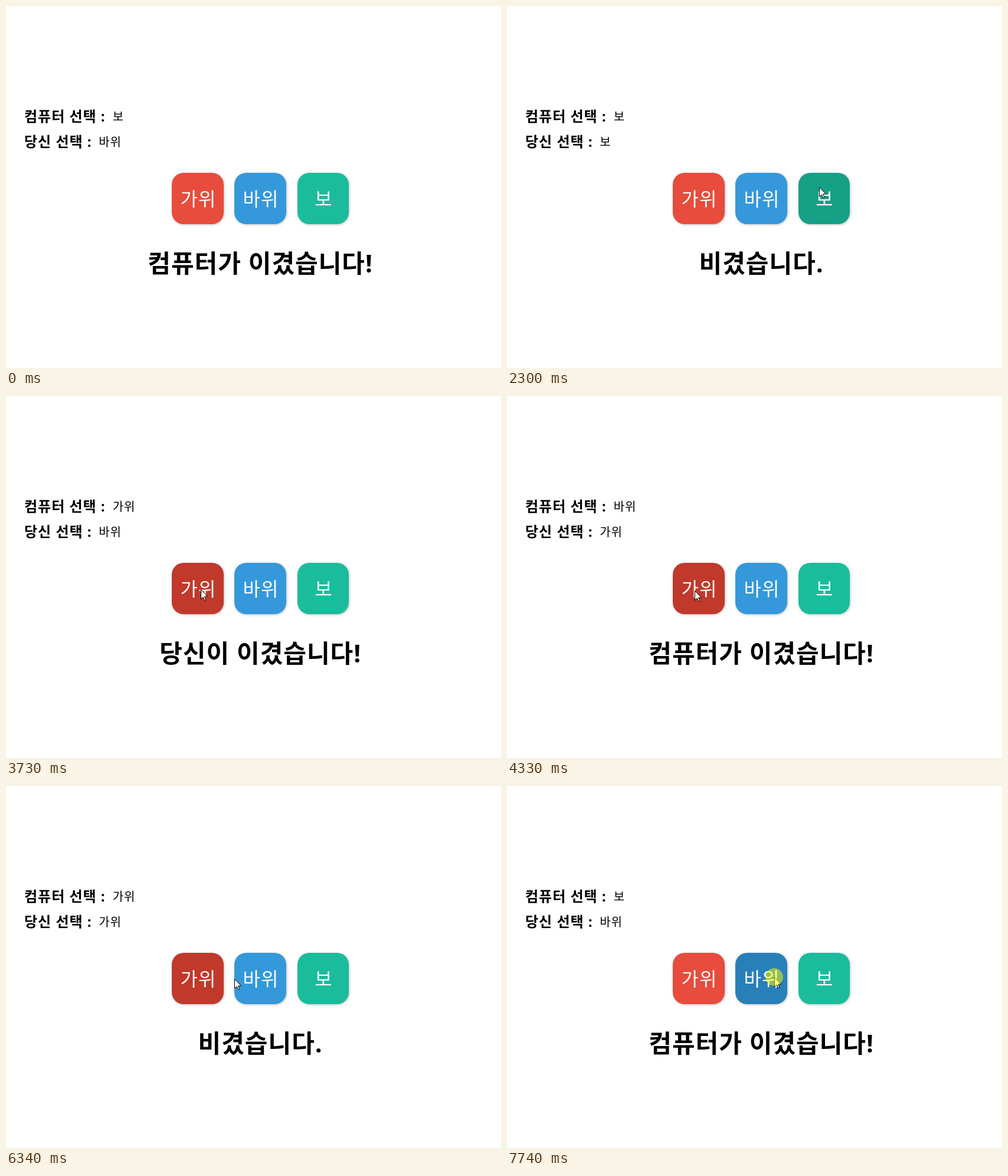
An HTML page that plays this animation: 839 px wide and 614 px high, repeating every 8000 ms.

```html
<!DOCTYPE html>
<html lang="ko">
<head>
<meta charset="utf-8">
<title>가위 바위 보</title>
<style>
  html, body { margin: 0; width: 100%; height: 100%; overflow: hidden; background: #fff; }
  svg { display: block; width: 839px; height: 614px; }
  text { font-family: "Open Sans", "Noto Sans CJK KR", "Noto Sans CJK", sans-serif; letter-spacing: 1px; }
  .label { font-size: 24px; font-weight: 700; }
  .value { font-size: 20px; font-weight: 300; }
  .result { font-size: 42px; font-weight: 700; text-anchor: middle; }
  .button text { font-size: 32px; font-weight: 350; fill: #fff; text-anchor: middle; }
  .button rect { filter: drop-shadow(1px 1px 2px rgba(0, 0, 0, .25)); }
</style>
</head>
<body>
<svg viewBox="0 0 839 614">
  <text class="label" x="31" y="195.5">컴퓨터 선택 :</text>
  <text class="value" id="computer" x="180.7" y="194.5"></text>
  <text class="label" x="31" y="238.5">당신 선택 :</text>
  <text class="value" id="player" x="157.2" y="237.5"></text>
  <g id="buttons"></g>
  <text class="result" id="result" x="431.2" y="452"></text>
  <path id="cursor" d="M.5 .5V16.5L4.2 13L6.8 18.6L9 17.6L6.5 12H11.5Z" fill="#fff" stroke="#000"/>
  <circle id="halo" r="15" fill="#ff0" fill-opacity=".5"/>
</svg>
<script>
const LOOP = 8000;
const STEP = 70;
const HANDS = ['가위', '바위', '보'];
const RESULTS = ['비겼습니다.', '당신이 이겼습니다!', '컴퓨터가 이겼습니다!'];
const [SCISSORS, ROCK, PAPER] = [0, 1, 2];

const TOP = 283, HEIGHT = 87;
const BUTTONS = [
  { x: 281, width: 88, color: '#e74c3c', hover: '#c0392b' },
  { x: 387, width: 88, color: '#3498db', hover: '#2980b9' },
  { x: 494, width: 87, color: '#1abc9c', hover: '#16a085' },
];

// The pointer eases from the end of one move to the end of the next.
const ENTRY = [780, 189];
const MOVES = [
  { start: 1210, steps: 6, to: [478, 308] },
  { start: 1630, steps: 4, to: [529, 307] },
  { start: 2560, steps: 4, to: [433, 311] },
  { start: 3520, steps: 5, to: [318, 330] },
  { start: 6270, steps: 5, to: [453, 324] },
];

// Bursts of clicks; each click ends with a new pick by the computer.
const BURSTS = [
  { down: 2030, up: 2300, picks: [PAPER] },
  { down: 3040, up: 3250, picks: [SCISSORS] },
  { down: 4130, up: 4330, picks: [ROCK] },
  { down: 5060, up: 5260, every: 252, picks: [PAPER, SCISSORS, ROCK, PAPER, SCISSORS] },
  { down: 6810, up: 7010, picks: [ROCK] },
  { down: 7140, up: 7340, every: 200, picks: [PAPER, SCISSORS, PAPER, PAPER, PAPER] },
];
const clickTime = (burst, i) => burst.up + i * (burst.every || 0);

const easeOut = p => 1 - (1 - p) ** 1.4;

function pointerAt(time) {
  const index = MOVES.findLastIndex(move => move.start <= time);
  if (index < 0) return null;
  const { start, steps, to } = MOVES[index];
  const from = index ? MOVES[index - 1].to : ENTRY;
  const step = Math.min(steps, Math.floor((time - start) / STEP) + 1);
  const p = easeOut(step / steps);
  return from.map((value, axis) => Math.round(value + (to[axis] - value) * p));
}

// The hover colour trails the pointer by one step.
function hoveredAt(time) {
  const point = pointerAt(time - STEP);
  if (!point) return -1;
  const [x, y] = point;
  return BUTTONS.findIndex(b => x >= b.x && x < b.x + b.width && y >= TOP && y < TOP + HEIGHT);
}

const rounds = [{ time: 0, theirs: PAPER, yours: ROCK }];
for (const burst of BURSTS) {
  burst.picks.forEach((theirs, i) => {
    const time = clickTime(burst, i);
    rounds.push({ time, theirs, yours: hoveredAt(time) });
  });
}

const [computer, player, result, cursor, halo, buttons] =
  ['computer', 'player', 'result', 'cursor', 'halo', 'buttons'].map(id => document.getElementById(id));

function add(parent, tag, attributes) {
  const node = document.createElementNS('http://www.w3.org/2000/svg', tag);
  for (const name in attributes) node.setAttribute(name, attributes[name]);
  return parent.appendChild(node);
}

BUTTONS.forEach((button, i) => {
  const { x, width } = button;
  const group = add(buttons, 'g', { class: 'button' });
  button.rect = add(group, 'rect', { x, y: TOP, width, height: HEIGHT, rx: 20 });
  add(group, 'text', { x: x + width / 2 + 1, y: 339 }).textContent = HANDS[i];
});

function show(node, point) {
  node.style.display = point ? '' : 'none';
  if (point) node.setAttribute('transform', `translate(${point})`);
}

function draw(time) {
  const { theirs, yours } = rounds.findLast(round => round.time <= time);
  computer.textContent = HANDS[theirs];
  player.textContent = HANDS[yours];
  result.textContent = RESULTS[(yours - theirs + 3) % 3];

  const hovered = hoveredAt(time);
  BUTTONS.forEach(({ rect, color, hover }, i) => rect.setAttribute('fill', i === hovered ? hover : color));

  const point = pointerAt(time);
  const pressed = BURSTS.some(b => time >= b.down && time < clickTime(b, b.picks.length - 1));
  show(cursor, point);
  show(halo, pressed && point);
}

function tick() {
  draw(performance.now() % LOOP);
  requestAnimationFrame(tick);
}
tick();
</script>
</body>
</html>
```
